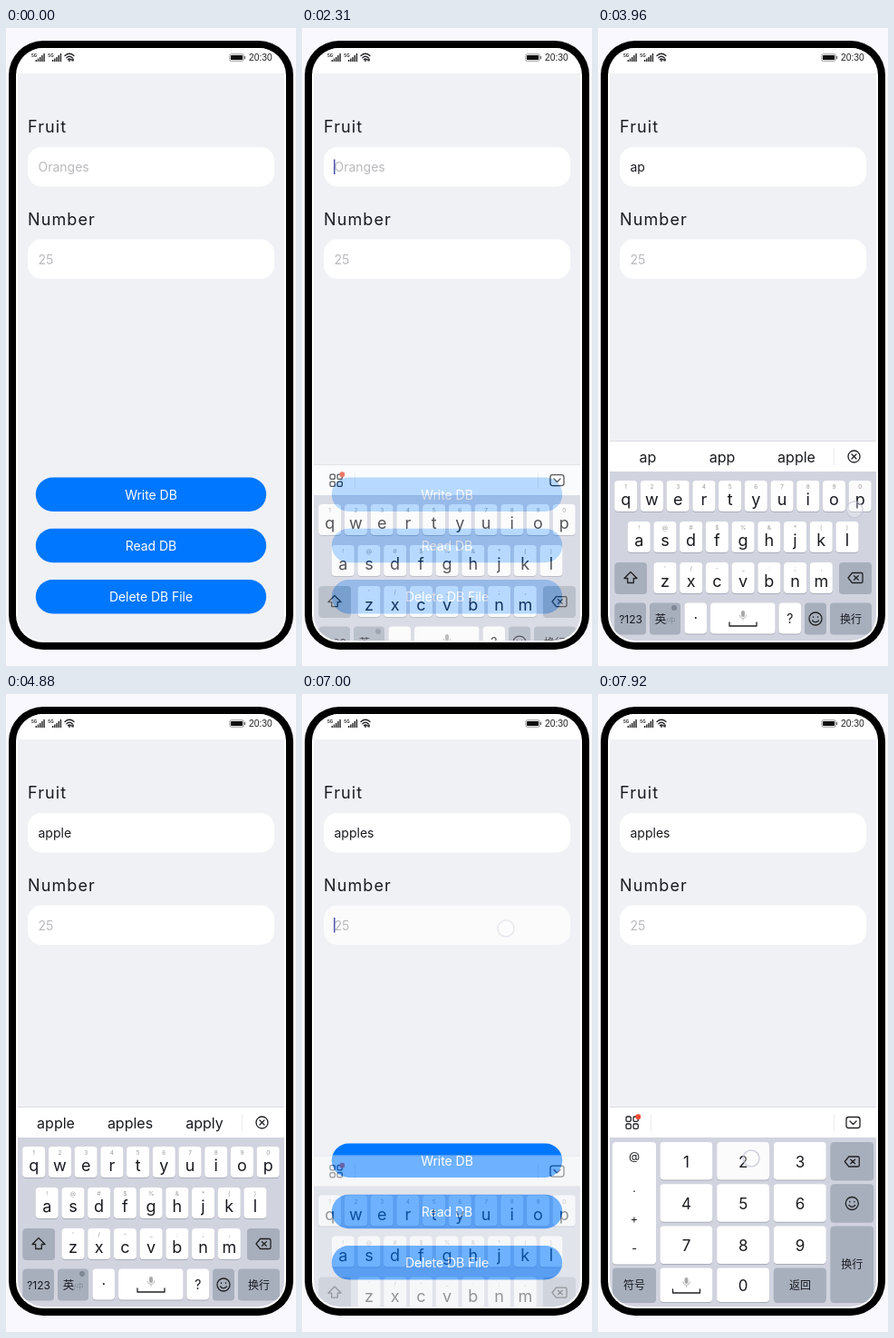
Recreate the animation shown at these times as an HTML page. Size 320 by 702 pixels, loop 7990 ms.

```html
<!DOCTYPE html>
<html lang="en">
<head>
<meta charset="utf-8">
<title>Fruit form</title>
<style>
html, body { margin: 0; width: 100%; height: 100%; overflow: hidden; background: #f8f8fe; }
svg { display: block; width: 100vw; height: 100vh; font-family: Inter, "Noto Sans CJK SC", "Noto Sans CJK", sans-serif; }
.line { fill: none; stroke: #202124; stroke-width: 1.3; stroke-linecap: round; stroke-linejoin: round; }
</style>
</head>
<body>
<svg id="stage" viewBox="0 0 320 702"></svg>
<script>
const LOOP = 7990;
const INK = '#191a20', FUNC = '#a7afbc', TRAY = '#d1d4df', BLUE = '#0077ff';
const stage = document.getElementById('stage');

const rect = (x, y, w, h, fill, r = 0, extra = '') =>
  `<rect x="${x}" y="${y}" width="${w}" height="${h}" rx="${r}" fill="${fill}" ${extra}/>`;
const text = (x, y, size, label, fill = INK, anchor = 'middle', extra = '') =>
  `<text x="${x}" y="${y}" font-size="${size}" fill="${fill}" text-anchor="${anchor}" ${extra}>${label}</text>`;
const line = (d, extra = '') => `<path class="line" d="${d}" ${extra}/>`;
const at = (x, y, body) => `<g transform="translate(${x} ${y})">${body}</g>`;

const key = (x, y, w, h, fill = '#fff', id = '') =>
  rect(x, y + 1, w, h, '#a9adb9', 4) + rect(x, y, w, h, fill, 4, id && `id="${id}"`);

// Icons are centred on their own origin.
const icons = {
  del: line('M-8 0L-3.5-5.5H6.5Q8-5.5 8-4V4Q8 5.5 6.5 5.5H-3.5ZM-1.5-2.3L3.3 2.3M3.3-2.3L-1.5 2.3'),
  face: line('M-7 0A7 7 0 1 1 7 0A7 7 0 1 1-7 0M-3.4 2Q0 5.6 3.4 2M-2.5-2.2V-1.6M2.5-2.2V-1.6'),
  shift: line('M0-6.5L7 .5H3.3V5.5H-3.3V.5H-7Z'),
  close: line('M-6.5 0A6.5 6.5 0 1 1 6.5 0A6.5 6.5 0 1 1-6.5 0M-2.5-2.5L2.5 2.5M2.5-2.5L-2.5 2.5'),
  hide: rect(-7.5, -6, 15, 12, 'none', 2.5, 'class="line"') + line('M-3.5-1.5L0 2L3.5-1.5'),
  space: w => line(`M${-w} 3V7H${w}V3`, 'stroke-width="1.5"') + rect(-2, -10, 4, 7, '#aaa', 2) +
    line('M-3.8-5Q-3.5-1.5 0-1.5Q3.5-1.5 3.8-5M0-1.5V.5', 'style="stroke:#bbb;stroke-width:1"'),
  grid: [[-7, -7], [1, -7], [-7, 1], [1, 1]].map(([x, y]) =>
    rect(x, y, 5.3, 5.3, 'none', 1.4, 'class="line"')).join('') + '<circle cx="6.3" cy="-6.8" r="2.9" fill="#ee4b35"/>'
};

const separator = x => rect(x, 463, 1, 18, '#eaebed');
const tray = rect(13, 454, 294, 34, '#fff') + rect(13, 454, 294, 1, '#dcdde1') + rect(13, 488, 294, 190, TRAY);
const plainBar = at(38, 472, icons.grid) + separator(58) + separator(260) + at(281.5, 471.5, icons.hide);

function letterRow(letters, hints, x0, y) {
  return [...letters].map((c, i) => {
    const x = x0 + 28.72 * i, mid = x + 12.5;
    return key(x, y, 25, 34, '#fff', 'key-' + c) + text(mid, y + 9, 6.5, hints[i], '#999') +
      text(mid, y + 27, 18, c);
  }).join('');
}

const letterBoard = tray +
  `<g id="plain">${plainBar}</g><g id="words">${[55, 137, 219].map(x => text(x, 477.5, 16, '', INK, 'middle', 'class="word"')).join('')}
  ${separator(260)}${at(282.5, 471.5, icons.close)}</g>` +
  letterRow('qwertyuiop', '1234567890', 18.2, 498) +
  letterRow('asdfghjkl', '!@#$%&*()'.split('').map(c => c === '&' ? '&amp;' : c), 32.7, 543) +
  letterRow('zxcvbnm', "'/-_:;,", 61.5, 588) +
  key(18.5, 588, 35.5, 34, FUNC) + at(36, 605, icons.shift) +
  key(266, 588, 36, 34, FUNC) + at(284, 605, icons.del) +
  key(18.5, 632.5, 34.5, 34, FUNC) + text(36, 654.5, 12, '?123') +
  key(57, 632.5, 34, 34, FUNC) + text(69, 654.5, 12.5, '英') + text(80, 655, 8, '/中', '#818995') +
  '<circle cx="84" cy="638" r="3" fill="#7e8795"/>' +
  key(95.5, 632.5, 24.5, 34) + text(107.8, 655, 16, '·') +
  key(124, 632.5, 71.5, 34) + at(160, 651, icons.space(15)) +
  key(199.5, 632.5, 24.5, 34) + text(211.8, 655, 14, '?') +
  key(228, 632.5, 24, 34, FUNC) + at(240, 650, icons.face) +
  key(256, 632.5, 46, 34, FUNC) + text(279, 654.5, 12, '换行');

const digitKeys = [...'123456789'].map((c, i) => {
  const x = 68.5 + 62.7 * (i % 3), y = 493 + 46.3 * Math.floor(i / 3);
  return key(x, y, 57.8, 41.5, '#fff', 'key-' + c) + text(x + 29, y + 27.5, 17, c);
}).join('');

const digitBoard = tray + plainBar + key(16, 493, 48, 134.5) +
  [['@', 513], ['.', 548], ['+', 581.5], ['-', 614]].map(([c, y]) => text(40, y, 12.5, c)).join('') + digitKeys +
  key(16, 631.5, 48, 37.5, FUNC) + text(40, 655, 12, '符号') +
  key(68.5, 631.5, 57.8, 37.5) + at(97.5, 652, icons.space(15)) +
  key(131.2, 631.5, 57.8, 37.5) + text(160.2, 656.5, 17, '0') +
  key(193.9, 631.5, 57.8, 37.5, FUNC) + text(223, 655, 12, '返回') +
  key(256.6, 493, 47.5, 41.5, FUNC) + at(280.3, 514.5, icons.del) +
  key(256.6, 539.3, 47.5, 41.5, FUNC) + at(280.3, 560.5, icons.face) +
  key(256.6, 585.6, 47.5, 83.4, FUNC) + text(280.3, 632, 12, '换行');

const signal = x => text(x, 32, 4.6, '5G', '#222', 'start', 'font-weight="700"') +
  [2, 3.5, 5, 7, 9].map((h, i) => rect(x + 4.6 + i * 2.2, 37 - h, 1.4, h, '#222')).join('');

const statusBar = rect(11, 20, 298, 30, '#fff') + signal(28) + signal(46.3) +
  line('M65 30.5Q70 26 75 30.5M66.8 32.7Q70 29.8 73.2 32.7M68.4 34.7Q70 33.3 71.6 34.7', 'stroke-width="1.2"') +
  '<circle cx="70" cy="36" r=".9" fill="#222"/>' + rect(72.3, 33.5, 2.5, 3, '#333') +
  rect(246.8, 28.8, 15.6, 7.4, '#fff', 1.8, 'stroke="#777" stroke-width=".8"') +
  rect(248, 30, 13.2, 5, '#111', .8) + rect(263, 31, 1.2, 3, '#777') +
  text(268, 36, 10.3, '20:30', '#222', 'start', 'font-family="Liberation Sans, sans-serif"');

const field = (label, y, id) =>
  text(24, y - 16, 18, label, INK, 'start', 'letter-spacing="1.1"') +
  rect(24, y, 272, 43.5, '#fff', 15, `id="${id}"`) +
  text(35.5, y + 27, 14, '', INK, 'start', `id="${id}-text"`) +
  rect(35, y + 13.5, 1.5, 16.5, '#4855a8', 0, `id="${id}-caret"`);
const button = (label, y) =>
  rect(32.8, y, 254.4, 37.5, BLUE, 18.75) + text(160, y + 24, 14, label, '#fff', 'middle', 'letter-spacing="-.05"');

stage.innerHTML = `
<defs><clipPath id="screen"><rect x="13" y="22" width="294" height="652" rx="28"/></clipPath></defs>
${rect(3, 14, 314, 670, '#000', 38)}${rect(11, 22, 298, 654, '#fff', 30)}
<g clip-path="url(#screen)">
  ${rect(13, 50, 294, 626, '#f0f1f5')}${statusBar}
  ${field('Fruit', 131, 'fruit')}${field('Number', 232.5, 'number')}
  ${button('Write DB', 494.5)}${button('Read DB', 550.8)}${button('Delete DB File', 607)}
  <g id="letters">${letterBoard}</g><g id="digits">${digitBoard}</g>
</g>
<circle id="touch" r="9" fill="#fff" fill-opacity=".3" stroke="#c3c6d6" stroke-opacity=".75" stroke-width="1.5"/>`;

const $ = id => document.getElementById(id);
const clamp = v => Math.max(0, Math.min(1, v));
const easeOut = v => 1 - (1 - clamp(v)) ** 2;

// [time, fruit text, suggestions]
const typing = [
  [0, '', ''],
  [3240, 'a', 'a and are'],
  [3700, 'ap', 'ap app apple'],
  [4090, 'app', 'app apple apps'],
  [4500, 'appl', 'appl apple apply'],
  [4820, 'apple', 'apple apples apply'],
  [5460, 'apples', 'apples apple applet'],
  [5890, 'apples', 'and are in'],
  [6860, 'apples', '']
];
// [start, end, x, y, pressed element]
const touches = [
  [1990, 2200, 215, 156, 'fruit'],
  [3050, 3270, 46, 568, 'key-a'],
  [3570, 3740, 285, 527, 'key-p'],
  [3930, 4130, 283, 530, 'key-p'],
  [4370, 4550, 277, 568, 'key-l'],
  [4700, 4860, 86, 525, 'key-e'],
  [5290, 5500, 75, 567, 'key-s'],
  [5740, 5940, 57, 474, ''],
  [6800, 7030, 225, 258, 'number'],
  [7850, 8100, 169, 511, 'key-2']
];
const fruitCaret = [[2110, 2710], [3240, 3890], [4410, 4880], [5410, 6010], [6600, 6860]];
const numberCaret = [[6900, 7590]];

const within = (spans, t) => spans.some(([a, b]) => t >= a && t < b);
const show = (el, on) => { el.style.display = on ? '' : 'none'; };

function placeBoard(id, p) {
  show($(id), p > 0);
  $(id).setAttribute('transform', `translate(0 ${94 * (1 - p)})`);
  $(id).setAttribute('opacity', p);
}

function setField(id, value, hint) {
  const el = $(id + '-text');
  const label = value || hint;
  if (el.textContent !== label) el.textContent = label;
  el.setAttribute('fill', value ? INK : '#b9babd');
  $(id + '-caret').setAttribute('x', value ? 36 + el.getComputedTextLength() : 35);
}

function draw(t) {
  const [, value, suggestions] = typing.findLast(step => t >= step[0]);
  setField('fruit', value, 'Oranges');
  setField('number', '', '25');
  show($('fruit-caret'), within(fruitCaret, t));
  show($('number-caret'), within(numberCaret, t));

  show($('plain'), !suggestions);
  show($('words'), suggestions);
  const words = suggestions.split(' ');
  document.querySelectorAll('.word').forEach((el, i) => { el.textContent = words[i] || ''; });

  placeBoard('letters', t < 6000 ? easeOut((t - 2150) / 340) : 1 - clamp((t - 6870) / 230));
  placeBoard('digits', easeOut((t - 7200) / 340));

  const now = touches.find(([a, b]) => t >= a && t < b);
  show($('touch'), now);
  for (const [, , , , id] of touches) if (id) $(id).setAttribute('fill', '#fff');
  if (!now) return;
  const [start, end, x, y, id] = now;
  $('touch').setAttribute('cx', x);
  $('touch').setAttribute('cy', y);
  $('touch').setAttribute('opacity', clamp(Math.min((t - start + 25) / 60, (end - t) / 60)));
  if (id) $(id).setAttribute('fill', '#fbfbfc');
}

const origin = performance.now();
function frame() {
  draw((performance.now() - origin) % LOOP);
  requestAnimationFrame(frame);
}
frame();
</script>
</body>
</html>
```
